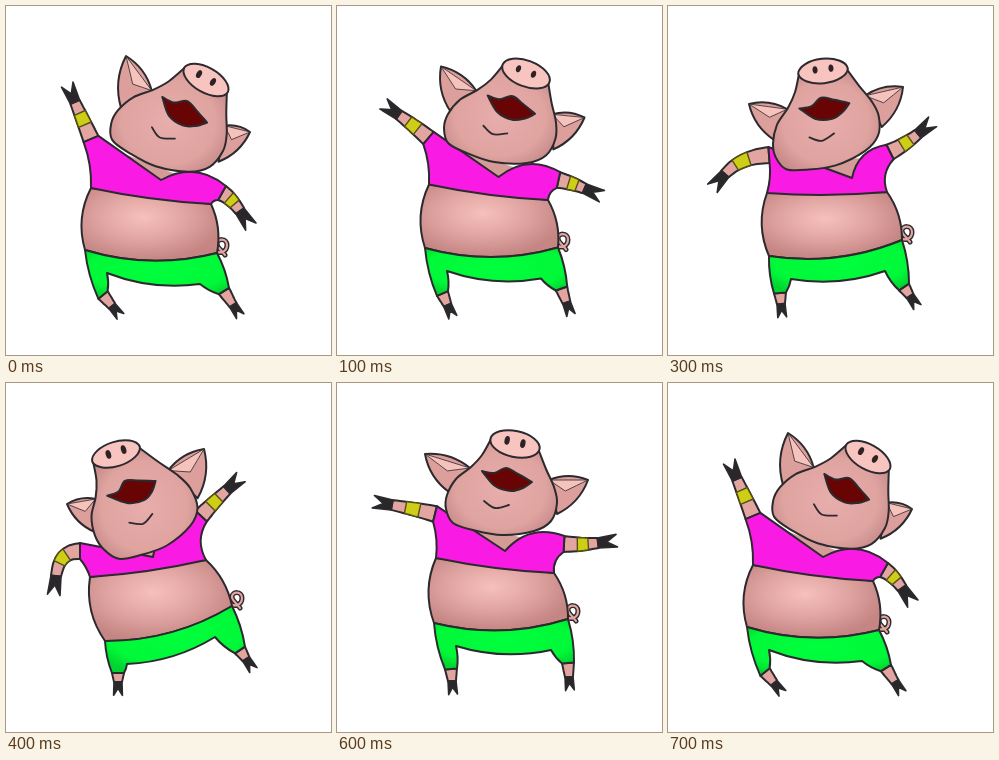
Write an HTML page that moves like this. It is 325 px wide and 349 px high and loops after 0.8 s.

```html
<!DOCTYPE html>
<html lang="en">
<head>
<meta charset="utf-8">
<title>Dancing pig</title>
<style>
html, body { margin: 0; width: 100%; height: 100%; overflow: hidden; background: #fff; }
svg { display: block; width: 100vw; height: 100vh; }
path { stroke-linejoin: round; stroke-linecap: round; }
</style>
</head>
<body>
<svg viewBox="0 0 325 349" xmlns="http://www.w3.org/2000/svg">
  <defs>
    <radialGradient id="skin" cx=".5" cy=".52" r=".62">
      <stop offset="0" stop-color="#e8aeab"/><stop offset=".65" stop-color="#dfa3a0"/><stop offset="1" stop-color="#c08583"/>
    </radialGradient>
    <radialGradient id="belly" cx=".45" cy=".4" r=".6">
      <stop offset="0" stop-color="#f6c0bb"/><stop offset=".5" stop-color="#e1a6a3"/><stop offset="1" stop-color="#c48583"/>
    </radialGradient>
    <radialGradient id="pants" cx=".5" cy=".4" r=".65">
      <stop offset="0" stop-color="#00ff3e"/><stop offset=".75" stop-color="#00f838"/><stop offset="1" stop-color="#00d430"/>
    </radialGradient>
  </defs>
  <g id="pig"></g>
</svg>
<script>
const points = text => text.split(' ').map(p => p.split(',').map(Number));

// Joints of the rig in each key pose, from one side of the sway to the other.
const joints = ('nose rootL rootR tipL tipR collar armL elbowL handL armR elbowR handR ' +
  'waistL waistR hipL hipR hemL hemR footL footR').split(' ');
const keyPoses = [
  '200,74 128,87 217,137 120,50 244,126 155,174 85,133 77,114 69,96 216,187 225,192 234,205 ' +
  '85,182 205,198 79,244 211,247 97,289 218,285 106,300 227,299',
  '178,61 118,92 217,113 88,71 251,97 168,168 98,131 78,126 55,122 227,161 245,162 261,160 ' +
  '99,175 217,190 97,240 231,236 114,286 231,280 115,298 232,294',
  '155,65 107,115 206,104 81,98 235,81 184,172 101,149 72,151 57,168 222,146 238,138 250,128 ' +
  '99,187 219,186 101,250 234,234 112,287 236,281 113,298 242,290',
  '110,71 82,130 177,100 61,121 198,66 147,174 74,168 53,168 50,193 195,133 207,120 221,107 ' +
  '84,194 200,177 99,258 226,223 112,290 234,267 112,299 240,276'
].map(points);

// Face drawn upright; it is fitted to the nose and ear roots of each pose.
const face = {
  head: points('154,56 145,72 134,84 119,96 110,112 109,126 116,140 136,147 165,152 197,148 214,138 220,120 217,104 209,86 202,68'),
  upperLip: points('145,88 157,90 169,85 181,91 195,99'),
  lowerLip: points('195,99 186,105 174,108 158,103 145,88'),
  smile: points('147,118 158,125 172,122'),
  earL: points('133,85 112,109'),
  earR: points('220,131 212,97')
};

const INK = '#2c2a2e';
const root = document.getElementById('pig');

function add(fill, stroke = INK, width = 2) {
  const el = document.createElementNS('http://www.w3.org/2000/svg', 'path');
  const attrs = { fill, stroke, 'stroke-width': width };
  for (const k in attrs) el.setAttribute(k, attrs[k]);
  return root.appendChild(el);
}

const mix = (a, b, k) => a.map((v, i) => v + (b[i] - v) * k);
const shift = (p, dx, dy) => [p[0] + dx, p[1] + dy];
const xy = p => p.map(v => v.toFixed(1)).join(' ');

// Smooth curve through points.
function spline(pts, lead = 'M') {
  let d = lead + xy(pts[0]);
  for (let i = 0; i + 1 < pts.length; i++) {
    const a = pts[i], b = pts[i + 1], before = pts[i - 1] || a, after = pts[i + 2] || b;
    const c1 = a.map((v, j) => v + (b[j] - before[j]) / 6);
    const c2 = b.map((v, j) => v - (after[j] - a[j]) / 6);
    d += `C${xy(c1)} ${xy(c2)} ${xy(b)}`;
  }
  return d;
}

// Closed outline; each side bulges by a share of its length.
function outline(pts, bulges) {
  return 'M' + xy(pts[0]) + pts.map((a, i) => {
    const b = pts[(i + 1) % pts.length], k = 2 * (bulges[i] || 0);
    const mid = mix(a, b, .5);
    return `Q${xy(shift(mid, -k * (b[1] - a[1]), k * (b[0] - a[0])))} ${xy(b)}`;
  }).join('') + 'Z';
}

function oval([cx, cy], rx, ry, turn) {
  const dx = rx * Math.cos(turn), dy = rx * Math.sin(turn), deg = turn * 180 / Math.PI;
  const arc = s => `A${rx} ${ry} ${deg} 0 1 ${xy([cx + s * dx, cy + s * dy])}`;
  return 'M' + xy([cx - dx, cy - dy]) + arc(1) + arc(-1) + 'Z';
}

// Point on the side of a limb, u from 0 at its start to 1 at the hoof.
function edge({ from, bend, to, w0, w1 }, u, side) {
  const v = 1 - u;
  const [dx, dy] = [0, 1].map(i => v * (bend[i] - from[i]) + u * (to[i] - bend[i]));
  const r = side * (w0 + (w1 - w0) * u) / Math.hypot(dx, dy);
  const mid = from.map((p, i) => v * v * p + 2 * u * v * bend[i] + u * u * to[i]);
  return shift(mid, -r * dy, r * dx);
}

const arm = (p, s) => ({ from: p['arm' + s], bend: p['elbow' + s], to: p['hand' + s], w0: 8, w1: 5, hoof: 20 });
const leg = (p, s) => {
  const from = p['hem' + s], to = p['foot' + s];
  return { from, bend: mix(from, to, .5), to, w0: 6, w1: 4, hoof: 14 };
};

function limb(build, side, banded) {
  const skin = add('#e2a5a0'), band = add('#cfce16', '#555018', 1.4), hoof = add('#29272a', INK, 1.6);
  const strip = (l, a, b) => {
    const us = [0, .25, .5, .75, 1].map(k => a + (b - a) * k);
    return spline(us.map(u => edge(l, u, 1))) + spline(us.reverse().map(u => edge(l, u, -1)), 'L') + 'Z';
  };
  return p => {
    const l = build(p, side), { bend, to } = l;
    skin.setAttribute('d', strip(l, 0, 1));
    if (banded) band.setAttribute('d', strip(l, .38, .7));
    const heading = Math.atan2(to[1] - bend[1], to[0] - bend[0]);
    const reach = (turn, length) => shift(to, length * Math.cos(heading + turn), length * Math.sin(heading + turn));
    hoof.setAttribute('d', outline(
      [edge(l, 1, 1), reach(.32, l.hoof), reach(0, l.hoof * .45), reach(-.32, l.hoof), edge(l, 1, -1)], []));
  };
}

function tail() {
  const strokes = [add('none', INK, 5), add('none', '#e2a5a0', 2.2)];
  strokes.forEach(el => el.setAttribute('d', 'M-7 4C-1 11 6 6 6 0C6 -7 -4 -7 -4 -1C-4 3 1 5 4 10'));
  return p => strokes.forEach(el => el.setAttribute('transform', `translate(${shift(p.hipR, 4, -8)})`));
}

function body() {
  const belly = add('url(#belly)'), pants = add('url(#pants)');
  return p => {
    const L = leg(p, 'L'), R = leg(p, 'R');
    belly.setAttribute('d', outline([p.waistL, p.hipL, p.hipR, p.waistR], [.1, .07, .08]));
    pants.setAttribute('d', outline([
      p.hipL, edge(L, 0, 1), edge(L, 0, -1), shift(p.hipL, 22, 23),
      shift(p.hipR, -17, 31), edge(R, 0, 1), edge(R, 0, -1), p.hipR
    ], [.04, 0, .05, .065, .05, 0, .04, -.07]));
  };
}

function shirt() {
  const neck = add('#d59b97', 'none'), cloth = add('#f91be4');
  return p => {
    const L = arm(p, 'L'), R = arm(p, 'R');
    const topL = edge(L, 0, 1), topR = edge(R, 0, -1);
    neck.setAttribute('d', outline([mix(p.collar, topL, .6), p.collar, mix(p.collar, topR, .6)], []));
    cloth.setAttribute('d', outline(
      [topL, edge(L, 0, -1), p.waistL, p.waistR, edge(R, 0, 1), topR, p.collar],
      [0, -.05, .02, -.15, 0, .17, 0]));
  };
}

// Affine map that carries the upright face onto a pose.
function fitFace(p) {
  const offsets = q => [q.rootL, q.rootR].map(r => shift(r, -q.nose[0], -q.nose[1]));
  const [l0, r0] = offsets(upright), [l1, r1] = offsets(p);
  const det = l0[0] * r0[1] - l0[1] * r0[0];
  return pt => {
    const [x, y] = shift(pt, -upright.nose[0], -upright.nose[1]);
    const a = (x * r0[1] - y * r0[0]) / det, b = (l0[0] * y - l0[1] * x) / det;
    return p.nose.map((v, i) => v + a * l1[i] + b * r1[i]);
  };
}

function ear(side, upper) {
  const flap = add('#dc9f9b'), light = add('#f5c2bc', INK, .8);
  return p => {
    const base = face['ear' + side].map(fitFace(p)), tip = p['tip' + side];
    const mid = mix(mix(...base, .5), tip, .35);
    flap.setAttribute('d', outline([base[0], tip, base[1]], [.1, .1]));
    light.setAttribute('d', outline([base[upper], tip, mid], []));
  };
}

function head() {
  const skull = add('url(#skin)'), mouth = add('#680404'), smile = add('none', INK, 1.8);
  const snout = add('#f7c4bf'), nostrils = [add('#2f2224', 'none'), add('#2f2224', 'none')];
  return p => {
    const fit = fitFace(p);
    const curve = (name, lead) => spline(face[name].map(fit), lead);
    skull.setAttribute('d', curve('head') + 'Z');
    mouth.setAttribute('d', curve('upperLip') + curve('lowerLip', 'L') + 'Z');
    smile.setAttribute('d', curve('smile'));
    const turn = Math.atan2(p.rootR[1] - p.rootL[1], p.rootR[0] - p.rootL[0]);
    snout.setAttribute('d', oval(p.nose, 25, 13, turn));
    nostrils.forEach((el, i) => {
      const reach = i ? 8 : -8;
      const spot = shift(p.nose, reach * Math.cos(turn), reach * Math.sin(turn) - 2);
      el.setAttribute('d', oval(spot, 2.6, 4.4, turn));
    });
  };
}

// Pose at any place along the sway, between the key poses.
function poseAt(place) {
  const i = Math.min(Math.floor(place), keyPoses.length - 2);
  return Object.fromEntries(joints.map((name, j) => [name, mix(keyPoses[i][j], keyPoses[i + 1][j], place - i)]));
}

const upright = poseAt(1);
const parts = [
  tail(), limb(leg, 'L'), limb(leg, 'R'), body(),
  limb(arm, 'L', true), limb(arm, 'R', true), shirt(),
  ear('L', 0), ear('R', 1), head()
];

const STEP = 100;
const sway = [0, .5, 1, 2, 3, 2, 1, 0];

function update(time) {
  const pose = poseAt(sway[Math.floor(time / STEP) % sway.length]);
  parts.forEach(draw => draw(pose));
}

function tick() {
  update(performance.now());
  requestAnimationFrame(tick);
}
tick();
</script>
</body>
</html>
```
